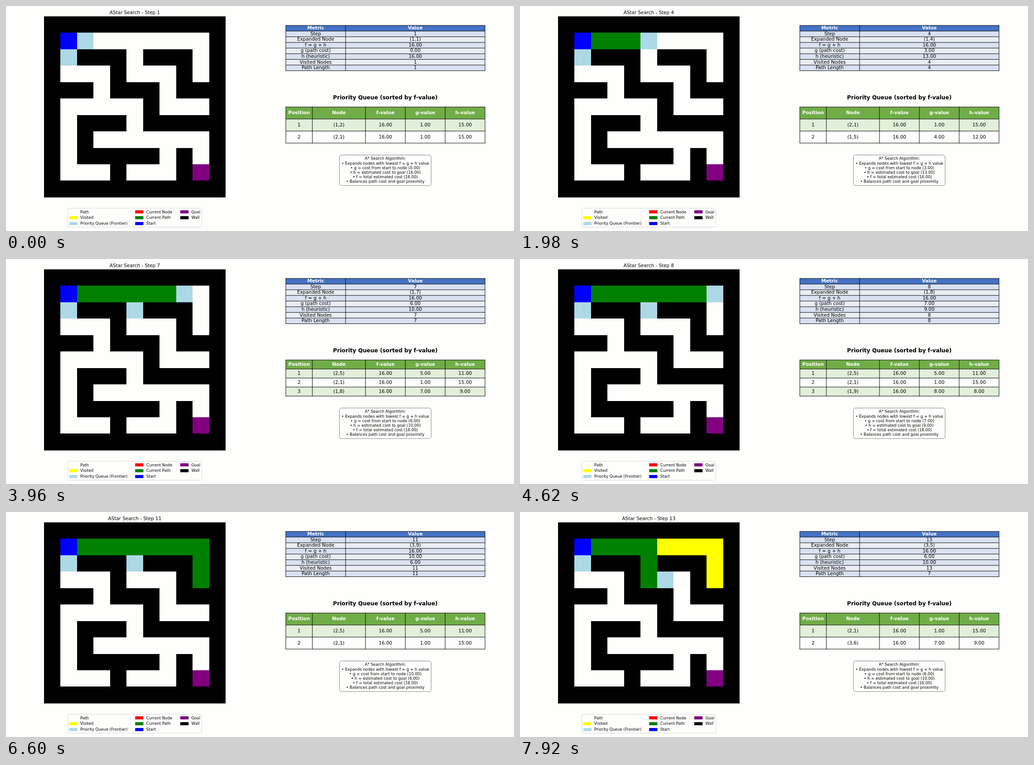
An HTML page with a canvas for the animation above (8 s loop, 1122 px wide and 499 px high).

```html
<!DOCTYPE html>
<html lang="en">
<head>
<meta charset="utf-8">
<title>AStar Search</title>
<style>
html, body { margin: 0; width: 100%; height: 100%; overflow: hidden; background: #fefefc; }
canvas { display: block; }
</style>
</head>
<body>
<canvas id="stage" width="1122" height="499"></canvas>
<script>
const ctx = document.getElementById('stage').getContext('2d');
const LOOP = 8000, STEP = 660, STEPS = 13;
const SMALL = 8.65, MEDIUM = 10.38, LARGE = 12.11;
const PAPER = '#fefefc';
const MAZE = [
  '###########',
  '#.........#',
  '#.###.###.#',
  '#...#...#.#',
  '###.###.###',
  '#.....#...#',
  '#.###.#####',
  '#.#.......#',
  '#.#####.#.#',
  '#...#...#.#',
  '###########'
];
const GOAL = 9;
const COLOR = {
  path: PAPER, visited: '#ffff00', frontier: '#add8e6', current: '#ff0000',
  route: '#008000', start: '#0000ff', goal: '#800080', wall: '#000000'
};

const label = n => `(${n.r},${n.c})`;
const makeNode = (r, c, parent) => ({
  r, c, parent,
  g: parent ? parent.g + 1 : 0,
  h: Math.abs(GOAL - r) + Math.abs(GOAL - c)
});

// A* search; ties on f go to the lower h.
function search() {
  const first = makeNode(1, 1, null);
  const seen = new Set([label(first)]);
  const visited = [], states = [], queue = [first];
  while (states.length < STEPS) {
    queue.sort((a, b) => a.g + a.h - b.g - b.h || a.h - b.h);
    const node = queue.shift();
    visited.push(node);
    for (const [dr, dc] of [[0, 1], [1, 0], [0, -1], [-1, 0]]) {
      const next = makeNode(node.r + dr, node.c + dc, node);
      if (MAZE[next.r][next.c] === '#' || seen.has(label(next))) continue;
      seen.add(label(next));
      queue.push(next);
    }
    const route = [];
    for (let n = node; n; n = n.parent) route.push(n);
    states.push({ node, route, queue: [...queue], visited: [...visited] });
  }
  return states;
}

function text(str, x, y, size, { bold = false, color = '#000', align = 'center' } = {}) {
  ctx.font = `${bold ? 'bold ' : ''}${size}px "DejaVu Sans", sans-serif`;
  ctx.fillStyle = color;
  ctx.textAlign = align;
  ctx.fillText(str, x, y);
}

function box(x, y, w, h, r, stroke) {
  ctx.beginPath();
  ctx.roundRect(x, y, w, h, r);
  ctx.strokeStyle = stroke;
  ctx.lineWidth = 1;
  ctx.stroke();
}

const edgeX = c => Math.round(84 + 36.46 * c);
const edgeY = r => Math.round(22.86 + 36.46 * r);

function cell(r, c, color) {
  const x = edgeX(c), y = edgeY(r);
  ctx.fillStyle = color;
  ctx.fillRect(x, y, edgeX(c + 1) - x, edgeY(r + 1) - y);
}

function drawMaze(s) {
  ctx.fillStyle = COLOR.wall;
  ctx.fillRect(84, 23, 401, 401.6);
  MAZE.forEach((row, r) => [...row].forEach((ch, c) => {
    if (ch === '.') cell(r, c, COLOR.path);
  }));
  const paint = (list, color) => list.forEach(n => cell(n.r, n.c, color));
  paint(s.visited, COLOR.visited);
  paint(s.queue, COLOR.frontier);
  paint(s.route, COLOR.route);
  cell(1, 1, COLOR.start);
  cell(GOAL, GOAL, COLOR.goal);
}

function drawLegend() {
  box(136.5, 448.5, 296, 42, 2, '#d8d8d6');
  const columns = [
    [139.7, [['Path', 'path'], ['Visited', 'visited'], ['Priority Queue (Frontier)', 'frontier']]],
    [285.3, [['Current Node', 'current'], ['Current Path', 'route'], ['Start', 'start']]],
    [385, [['Goal', 'goal'], ['Wall', 'wall']]]
  ];
  for (const [x, items] of columns) {
    items.forEach(([name, key], i) => {
      const y = 456.5 + 12.97 * i;
      ctx.fillStyle = COLOR[key];
      ctx.fillRect(x, y - 3.4, 18.2, 6.9);
      text(name, x + 24.4, y + 3, SMALL, { align: 'left' });
    });
  }
}

function drawTable(xs, top, bottom, rows, head, fills) {
  const h = (bottom - top) / rows.length;
  const left = xs[0], right = xs[xs.length - 1];
  rows.forEach((row, i) => {
    ctx.fillStyle = i ? fills[(i - 1) % 2] : head;
    ctx.fillRect(left, top + h * i, right - left, h);
  });
  ctx.strokeStyle = '#000';
  ctx.lineWidth = 1;
  ctx.beginPath();
  for (const x of xs) {
    ctx.moveTo(x, top - 0.5);
    ctx.lineTo(x, bottom + 0.5);
  }
  for (let i = 0; i <= rows.length; i++) {
    ctx.moveTo(left, top + h * i);
    ctx.lineTo(right, top + h * i);
  }
  ctx.stroke();
  rows.forEach((row, i) => row.forEach((str, j) => {
    const style = i ? {} : { bold: true, color: '#fff' };
    text(str, (xs[j] + xs[j + 1]) / 2, top + h * (i + 0.5) + 2.9, MEDIUM, style);
  }));
}

function draw(i) {
  const s = states[i], n = s.node;
  const f = (n.g + n.h).toFixed(2), g = n.g.toFixed(2), h = n.h.toFixed(2);
  ctx.fillStyle = PAPER;
  ctx.fillRect(0, 0, 1122, 499);

  text(`AStar Search - Step ${i + 1}`, 284.4, 18, MEDIUM);
  drawMaze(s);
  drawLegend();

  drawTable([618, 750, 1058], 43.1, 143.5, [
    ['Metric', 'Value'],
    ['Step', i + 1],
    ['Expanded Node', label(n)],
    ['f = g + h', f],
    ['g (path cost)', g],
    ['h (heuristic)', h],
    ['Visited Nodes', s.visited.length],
    ['Path Length', s.route.length]
  ], '#4472c4', ['#d9e1f2', '#e9eef4']);

  text('Priority Queue (sorted by f-value)', 837.8, 207.4, LARGE, { bold: true });
  drawTable([618, 676.6, 794, 882, 970, 1058], 224, 304, [
    ['Position', 'Node', 'f-value', 'g-value', 'h-value'],
    ...s.queue.map((q, k) => [k + 1, label(q), ...[q.g + q.h, q.g, q.h].map(v => v.toFixed(2))])
  ], '#70ad47', ['#e2efda', PAPER]);

  box(736.5, 330.5, 202.5, 67.7, 4.5, '#808080');
  [
    'A* Search Algorithm:',
    '• Expands nodes with lowest f = g + h value',
    `• g = cost from start to node (${g})`,
    `• h = estimated cost to goal (${h})`,
    `• f = total estimated cost (${f})`,
    '• Balances path cost and goal proximity'
  ].forEach((line, k) => text(line, 837.8, 341.4 + 10.14 * k, SMALL));
}

const states = search();
let shown = -1;

function tick() {
  const i = Math.floor((performance.now() % LOOP) / STEP);
  if (i !== shown) draw(shown = i);
  requestAnimationFrame(tick);
}
tick();
</script>
</body>
</html>
```
